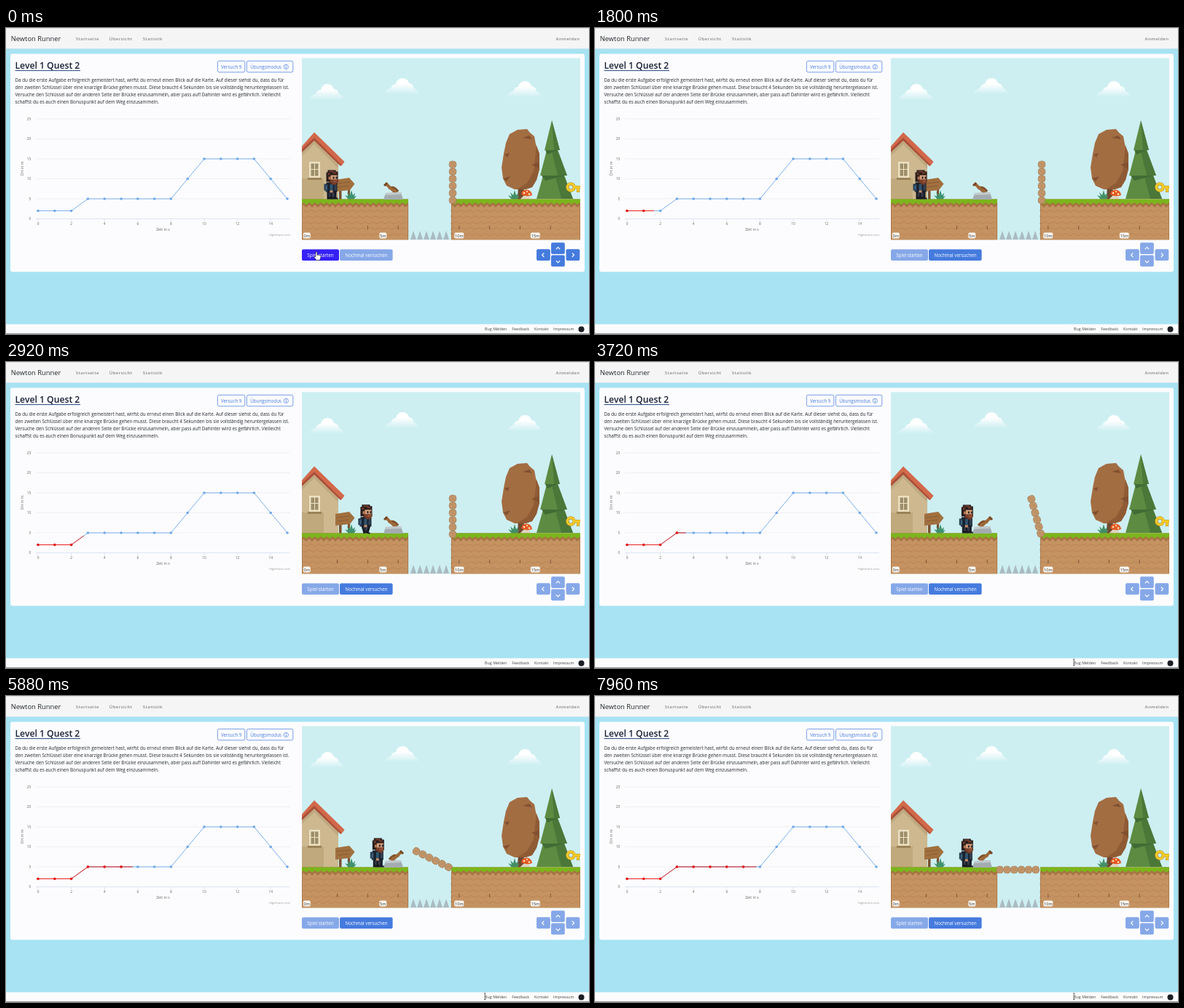
Recreate the animation shown at these times as an HTML page. Size 800 px wide and 421 px high, loop 8 s.

```html
<!DOCTYPE html>
<html lang="de">
<head>
<meta charset="utf-8">
<title>Newton Runner</title>
<style>
html, body { margin: 0; width: 100%; height: 100%; overflow: hidden; background: #a7e3f3; }
svg { display: block; width: 100vw; height: 100vh; font-family: "Open Sans", "Noto Sans", sans-serif; font-size: 6.28px; fill: #25292e; }
.nav { font-size: 6px; font-weight: 600; letter-spacing: .4px; fill: #858585; }
.axis { font-size: 4.8px; fill: #666; text-anchor: middle; }
.btn { fill: #fff; text-anchor: middle; }
.foot { font-size: 5.4px; fill: #444; }
.mark { font-size: 5.6px; text-anchor: middle; fill: #333; }
.blue { fill: #4479dc; text-anchor: middle; }
</style>
</head>
<body>
<svg viewBox="0 0 800 421">
  <defs>
    <clipPath id="stage"><rect x="406" y="41.5" width="382" height="250"/></clipPath>
    <linearGradient id="mist" x2="0" y2="1">
      <stop offset=".35" stop-color="#fff"/><stop offset="1" stop-color="#fff" stop-opacity="0"/>
    </linearGradient>
    <path id="cloud" fill="url(#mist)" d="M-23 14Q-22 7-15 6Q-13 0-8 0Q-6-8 1-8Q8-8 10-1Q16 0 17 6Q22 7 24 14Z"/>
    <path id="plant" d="M-3 0L-8-6L-3-4L-5-10L-1-6L1-13L3-6L6-9L5-4L8-5L4 0Z"/>
  </defs>
  <rect width="800" height="421" fill="#a7e3f3"/>
  <rect width="800" height="28.3" fill="#f5f5f5"/>
  <path d="M0 .3H800" stroke="#c9c9c9" stroke-width=".6"/>
  <path d="M0 28.4H800" stroke="#dfe6e8" stroke-width=".6"/>
  <text x="6.7" y="18.4" font-size="9.4">Newton Runner</text>
  <g class="nav">
    <text x="95.8" y="17.2">Startseite</text><text x="141.8" y="17.2">Übersicht</text>
    <text x="187.8" y="17.2">Statistik</text><text x="787.4" y="17.2" text-anchor="end">Anmelden</text>
  </g>
  <rect x="6" y="35.5" width="788" height="300" rx="3" fill="#fcfcfe"/>

  <text x="12.5" y="56.3" font-size="12.2" font-weight="600" fill="#172033">Level 1 Quest 2</text>
  <path d="M12.5 58.6H102" stroke="#26477f"/>
  <g fill="none" stroke="#5a88e0" stroke-width=".8">
    <rect x="290.4" y="45.4" width="37.4" height="15.4" rx="2"/>
    <rect x="330.4" y="45.4" width="63.4" height="15.4" rx="2"/>
    <circle cx="384.3" cy="53.4" r="3.1"/><path d="M384.3 52.7V55.4M384.3 51.1V51.9" stroke-width="1"/>
  </g>
  <text class="blue" x="309.2" y="55.6">Versuch 9</text>
  <text class="blue" x="356.6" y="55.6">Übungsmodus</text>
  <text x="12.5" y="73.5">Da du die erste Aufgabe erfolgreich gemeistert hast, wirfst du erneut einen Blick auf die Karte. Auf dieser siehst du, dass du für</text>
  <text x="12.5" y="83.5">den zweiten Schlüssel über eine knarzige Brücke gehen musst. Diese braucht 4 Sekunden bis sie vollständig heruntergelassen ist.</text>
  <text x="12.5" y="93.5">Versuche den Schlüssel auf der anderen Seite der Brücke einzusammeln, aber pass auf! Dahinter wird es gefährlich. Vielleicht</text>
  <text x="12.5" y="103.5">schaffst du es auch einen Bonuspunkt auf dem Weg einzusammeln.</text>

  <g id="chart"></g>
  <g class="axis">
    <text x="215.5" y="278.6" font-size="5.2">Zeit in s</text>
    <text transform="translate(23.6 193.5) rotate(-90)" font-size="5.2">Ort in m</text>
    <text x="375.5" y="285.6" font-size="4" fill="#999">Highcharts.com</text>
  </g>
  <path id="redLine" fill="none" stroke="#e8201c"/>
  <g id="redDots" fill="#f0100c"></g>

  <g clip-path="url(#stage)">
    <rect x="406" y="41" width="382" height="251" fill="#cdeff2"/>
    <use href="#cloud" x="440" y="85"/><use href="#cloud" x="543" y="77"/><use href="#cloud" x="711" y="81"/>
    <!-- house -->
    <path d="M406 163L423 149L456 182V236H406Z" fill="#cdb890"/>
    <path d="M406 207H436V236H406Z" fill="#c0a97c"/>
    <path d="M406 171L423 155L456 187V193L423 160L406 176Z" fill="#b9a179" opacity=".65"/>
    <path d="M404 165L423 143.5L464.5 184L460 190L423 153L404 171Z" fill="#d2694a"/>
    <path d="M404 169L423 151L460 188L459 190L423 155L404 173Z" fill="#a94f38"/>
    <path d="M416 184H431V207H416Z" fill="#ede1c2"/>
    <path d="M418 186H429V204H418ZM423.5 186V204M418 194.5H429" fill="#9d8d69" stroke="#ede1c2"/>
    <path d="M414 206H433V209H414Z" fill="#9b8258"/>
    <!-- sign -->
    <path d="M457 222H460.5V236H457ZM469 222H472V236H469Z" fill="#79502f"/>
    <path d="M452 209L471 206L478.5 214.5L472 223L452 225Z" fill="#a1703f"/>
    <path d="M454 214L472 212M455 219L470 217" stroke="#865a31" stroke-width=".9"/>
    <use href="#plant" x="473" y="236" fill="#3f9270"/>
    <!-- trees -->
    <path d="M703 215H710L712 236H702Z" fill="#704830"/>
    <path d="M702 140L715 139L719 144L725 149L727 160L732 173V194L728 209L722 219L713 222H698L687 217L682 207L680 192L683 173L686 158L691 146Z" fill="#a36d42"/>
    <path d="M728 162L732 173V194L728 209L722 219L713 222H701L715 213L724 197Z" fill="#8f5b35"/>
    <path d="M684 174L691 172L688 178M718 148L709 151L722 153M682 207L692 204L687 211M731 185L721 188L731 193" fill="#805030"/>
    <path d="M749 127L760 168L757 168L770 203L766 203L778 235H728L737 203L733 203L742 168L739 168Z" fill="#5d8b42"/>
    <path d="M749 127L760 168L757 168L770 203L766 203L778 235H762L754 205L757 203L749 170L752 168Z" fill="#4b7739"/>
    <path d="M740 168H757L743 174ZM735 203H767L740 210Z" fill="#426b34"/>
    <use href="#plant" x="697" y="236" fill="#438f68"/>
    <path d="M711 230H717L720 236H705Z" fill="#ded5c2"/>
    <path d="M707 229Q708 222 715 222.5Q721 223 722 230Q714 233 707 229Z" fill="#e45a24"/>
    <g fill="#fff0c4"><circle cx="711" cy="227" r="1.2"/><circle cx="715" cy="225" r="1"/><circle cx="718" cy="228.5" r="1.2"/></g>
    <g fill="none" stroke="#b78a16" stroke-width="4.2"><circle cx="775" cy="219" r="4.7"/><path d="M780 219H790M785 219V226"/></g>
    <g fill="none" stroke="#f5cb29" stroke-width="3"><circle cx="775" cy="219" r="4.7"/><path d="M780 219H790M785 219V225.4"/></g>

    <path id="spikes" fill="#aabbc1"/>
    <g id="ground"></g>
    <g id="bridge"></g>
    <!-- lever -->
    <g id="lever">
      <path d="M-7-4Q-1-9 6 0" fill="none" stroke="#815028" stroke-width="3"/>
      <path d="M3 2L-11-11" stroke="#9d6637" stroke-width="4"/>
      <path d="M-9-12L-13-8" stroke="#754722" stroke-width="3"/>
    </g>
    <path d="M518 236L521 227L542 226L545 236Z" fill="#a3acb0"/>
    <path d="M521 227L542 226L543 229L520 230Z" fill="#c2c9cb"/>
    <!-- hero -->
    <g id="hero">
      <g id="legA"><path d="M-7-11H0V0H-7Z" fill="#151720"/><path d="M-5-9H-2V-3H-5Z" fill="#323746"/></g>
      <g id="legB"><path d="M-1-11H6V-2H8V0H-1Z" fill="#181a24"/><path d="M0-9H3V-3H0Z" fill="#383c4c"/></g>
      <g id="torso">
        <path d="M-8-22H7V-9H-8Z" fill="#17202d"/>
        <path d="M-11-20H-6V-9H-9V-11H-11Z" fill="#24384c"/>
        <path d="M-9-18H-7V-12H-9Z" fill="#416886"/>
        <path d="M-3-20H1V-9H-3Z" fill="#32556f"/>
        <path d="M-3-11H1V-8H-3Z" fill="#c88d68"/>
        <path d="M3-19H6V-11H3Z" fill="#324256"/>
        <path d="M-6-39H5V-37H8V-23H6V-20H-4V-23H-8V-36H-6Z" fill="#261b1b"/>
        <path d="M-4-38H3V-36H-4ZM-6-35H-3V-32H-6ZM1-36H6V-34H1Z" fill="#713c2b"/>
        <path d="M-2-32H7V-25H-2Z" fill="#d9a17a"/>
        <path d="M-5-30H-2V-26H-5Z" fill="#b47857"/>
        <path d="M1-30H3V-27H1ZM5-30H7V-27H5Z" fill="#24202a"/>
        <path d="M-3-26H8V-22H6V-19H0V-21H-3Z" fill="#793e2a"/>
        <path d="M2-24H6V-23H2Z" fill="#b86d4a"/>
      </g>
    </g>
  </g>

  <g id="buttons"></g>
  <text class="btn" x="431.5" y="314.7">Spiel starten</text>
  <text class="btn" x="494.5" y="314.7">Nochmal versuchen</text>
  <path d="M754.8 304.3L757.5 301.6L760.2 304.3M754.8 320.2L757.5 322.9L760.2 320.2M738.3 309.6L735.6 312.3L738.3 315M776.8 309.6L779.5 312.3L776.8 315" fill="none" stroke="#fff" stroke-width="1.2"/>

  <rect y="407.5" width="800" height="13" fill="#fcfcfc"/>
  <path d="M0 420.6H800" stroke="#777" stroke-width=".8"/>
  <g class="foot">
    <text x="657" y="416.3">Bug Melden</text><text x="694.3" y="416.3">Feedback</text>
    <text x="725" y="416.3">Kontakt</text><text x="751" y="416.3">Impressum</text>
  </g>
  <circle cx="789.5" cy="414.4" r="4" fill="#1b1f23"/>
  <path id="beam" d="M656 409H658.4M657.2 409V417.5M656 417.5H658.4" stroke="#333" stroke-width=".7"/>
  <path id="hand" d="M-2-4Q-1-5 0-4V0Q1-1 2 0Q3-.6 4 .6Q5 .2 5 2Q5 5 3 7H-1L-4 3Q-4 1-2 2Z" fill="#fff" stroke="#222" stroke-width=".6"/>
</svg>
<script>
const $ = id => document.getElementById(id);
const NS = 'http://www.w3.org/2000/svg';
const LOOP = 8000, START = 0.18;
const BRIDGE_START = 2.87, BRIDGE_SPEED = 22.5;

function add(parent, tag, attrs, text) {
  const el = document.createElementNS(NS, tag);
  for (const key in attrs) el.setAttribute(key, attrs[key]);
  if (text !== undefined) el.textContent = text;
  return parent.appendChild(el);
}
const move = (id, x, y, extra = '') => $(id).setAttribute('transform', `translate(${x} ${y}) ${extra}`);
const show = (id, on) => $(id).setAttribute('visibility', on ? 'visible' : 'hidden');
const clamp = (v, lo, hi) => Math.min(hi, Math.max(lo, v));

// Chart
const plan = [2, 2, 2, 5, 5, 5, 5, 5, 5, 10, 15, 15, 15, 15, 10, 5];
const px = s => 44 + 22.8 * s;
const py = m => 262.5 - 5.5 * m;
function posAt(s) {
  const i = clamp(Math.floor(s), 0, plan.length - 2);
  return plan[i] + (plan[i + 1] - plan[i]) * clamp(s - i, 0, 1);
}
const line = points => 'M' + points.map(p => p.join(' ')).join('L');
const points = plan.map((m, s) => [px(s), py(m)]);

const chart = $('chart');
for (let m = 0; m <= 25; m += 5) {
  add(chart, 'path', { d: `M41 ${py(m)}H390`, stroke: m ? '#e8e8ea' : '#ccd6eb', 'stroke-width': .6 });
  add(chart, 'text', { class: 'axis', x: 34.3, y: py(m) + 1.9, style: 'text-anchor:end' }, m);
}
for (let s = 0; s <= 14; s += 2) {
  add(chart, 'path', { d: `M${px(s)} 262.5v3.5`, stroke: '#ccd6eb', 'stroke-width': .6 });
  add(chart, 'text', { class: 'axis', x: px(s), y: 270.6 }, s);
}
add(chart, 'path', { d: line(points), fill: 'none', stroke: '#7cb0ea' });
const redDots = points.map(([cx, cy]) => {
  add(chart, 'circle', { cx, cy, r: 1.8, fill: '#70a8e6' });
  return add($('redDots'), 'circle', { cx, cy, r: 1.8 });
});

// Ground
function zigzag(x0, x1, y, dy) {
  let d = `M${x0} 235.5H${x1}V${y}`, k = 0;
  for (let x = x1; x > x0; x -= 4) d += `L${Math.max(x0, x - 4)} ${y + (++k % 2) * dy}`;
  return d + 'Z';
}
const ground = $('ground');
for (const [x0, x1] of [[406, 552], [611, 788]]) {
  add(ground, 'rect', { x: x0, y: 236, width: x1 - x0, height: 56, fill: '#c59261' });
  for (let y = 252; y < 291; y += 8) {
    let d = `M${x0} ${y}`;
    for (let x = x0; x <= x1; x += 3) d += `L${x} ${y + 1.4 * Math.sin(x * .55 + y)}`;
    add(ground, 'path', { d, fill: 'none', stroke: '#b98454', 'stroke-width': 1.5, opacity: .6 });
  }
  add(ground, 'path', { d: zigzag(x0, x1, 243, 4), fill: '#a77243' });
  add(ground, 'path', { d: zigzag(x0, x1, 240, 3), fill: '#7cb51c' });
  add(ground, 'path', { d: `M${x0 + .4} 242V291M${x1 - .4} 242V291`, stroke: '#a57346', 'stroke-width': .8 });
}
const mx = m => 412.8 + 20.9 * m;
for (let m = 2; m < 18; m += 2)
  if (m !== 8) add(ground, 'path', { d: `M${mx(m)} 272v5`, stroke: '#684a33', 'stroke-width': .8 });
for (let m = 0; m <= 15; m += 5) {
  const w = m > 9 ? 13 : 10;
  add(ground, 'rect', { x: mx(m) - w / 2, y: 281.5, width: w, height: 8, rx: 2, fill: '#faf7f2' });
  add(ground, 'text', { class: 'mark', x: mx(m), y: 287.5 }, m + 'm');
}
let spikes = '';
for (let i = 0; i < 6; i++) spikes += `M${555 + i * 9} 291l4 -12l4 12Z`;
$('spikes').setAttribute('d', spikes);

// Bridge logs
for (let i = 0; i < 6; i++) {
  const y = -9.85 * i;
  add($('bridge'), 'rect', { x: -4.8, y: y - 4.6, width: 9.6, height: 9.2, rx: 3.8, fill: '#c3976b', stroke: '#a47a50', 'stroke-width': .8 });
  add($('bridge'), 'path', { d: `M-2.5 ${y - 1.3}H2M-1 ${y + 1.4}H3`, stroke: '#ae8357', 'stroke-width': .7 });
}

// Controls
const button = (x, y, w, h) => add($('buttons'), 'rect', { x, y, width: w, height: h, rx: 2 });
const startBtn = button(406, 304.5, 51, 15.6);
const retryBtn = button(458, 304.5, 72.6, 15.6);
const arrows = [[748, 295.3], [748, 312.5], [728, 304.3], [768.5, 304.3]].map(([x, y]) => button(x, y, 18.8, 15.8));

function draw(t) {
  const s = t / 1000 - START;
  const running = s >= 0;

  startBtn.setAttribute('fill', running ? '#86a8e8' : '#3521f5');
  retryBtn.setAttribute('fill', running ? '#457bde' : '#86a8e8');
  for (const a of arrows) a.setAttribute('fill', running ? '#86a8e8' : '#457bde');

  const done = points.filter((p, i) => i <= s);
  $('redLine').setAttribute('d', running ? line([...done, [px(s), py(posAt(s))]]) : '');
  redDots.forEach((dot, i) => dot.setAttribute('visibility', running && i <= s ? 'visible' : 'hidden'));

  const walking = s > 2 && s < 3;
  const swing = walking ? Math.sin((s - 2) * Math.PI * 5) : 0;
  const bob = walking ? Math.abs(swing) : Math.floor(t / 400) % 2;
  move('hero', 447.5 + 21.1 * (posAt(s) - 2), 235.5);
  move('torso', 0, bob - 1);
  move('legA', 0, 0, `rotate(${swing * 20} -3 -11)`);
  move('legB', 0, 0, `rotate(${-swing * 20} 2 -11)`);

  const angle = clamp((s - BRIDGE_START) * BRIDGE_SPEED, 0, 90);
  const lift = angle < 90 ? 237 - 2 * Math.sin(angle * Math.PI / 90) : 239;
  move('bridge', 613 - angle / 11, lift, `rotate(${-angle})`);
  move('lever', 532, 225, s > BRIDGE_START ? 'scale(-1 1)' : '');

  const k = clamp((t - 350) / 650, 0, 1);
  const ease = k * k * (3 - 2 * k);
  move('hand', 427 + 90 * ease, 312.5 + 120 * ease);
  show('hand', k < 1);
  show('beam', t >= 3400);
}

function tick(now) {
  draw(now % LOOP);
  requestAnimationFrame(tick);
}
draw(0);
requestAnimationFrame(tick);
</script>
</body>
</html>
```
